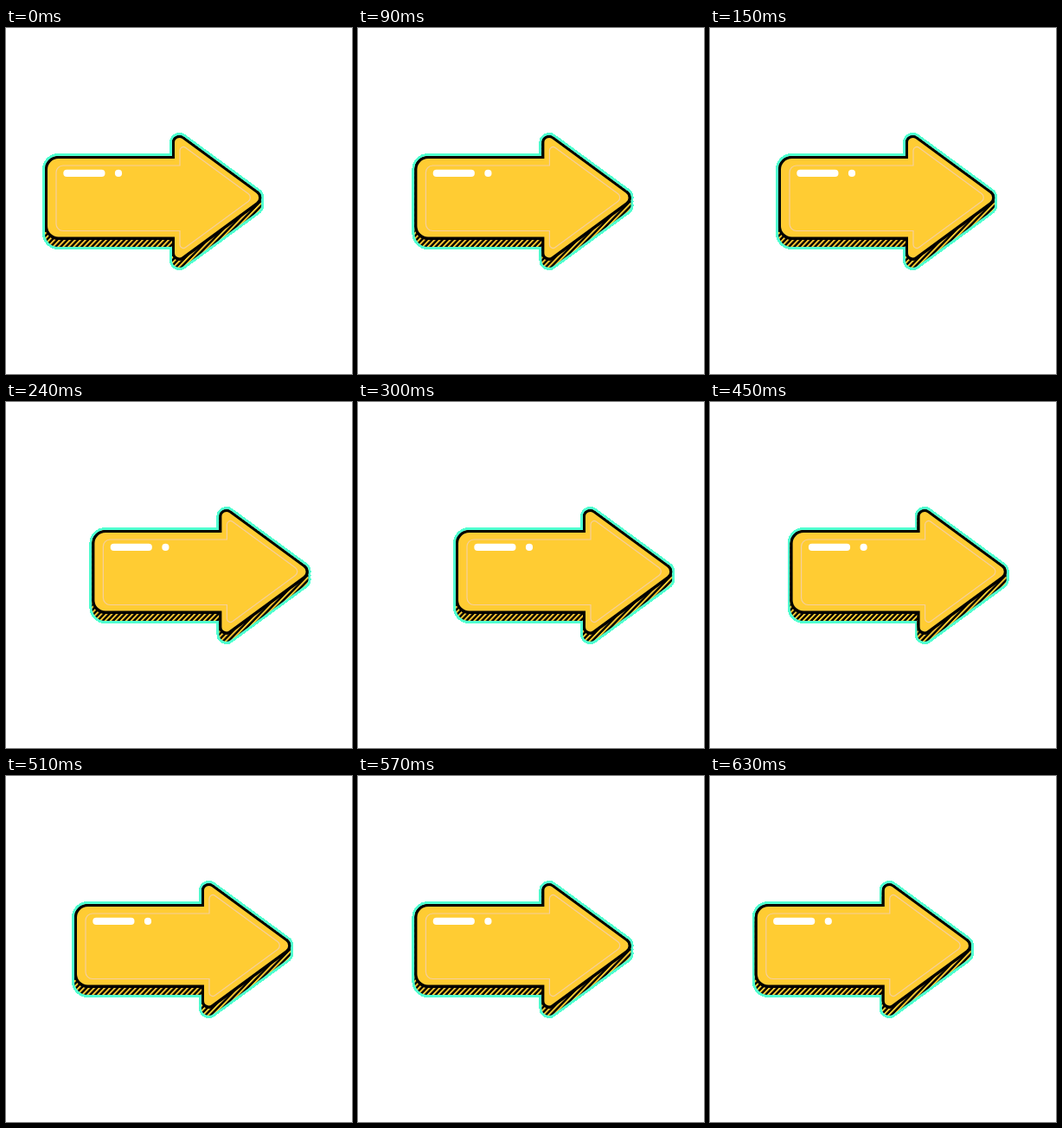
An HTML page that plays this animation: 400 px wide and 400 px high, repeating every 0.66 s.

```html
<!DOCTYPE html>
<html lang="en">
<head>
<meta charset="utf-8">
<title>Sliding arrow</title>
<style>
  html, body { margin: 0; width: 100%; height: 100%; overflow: hidden; background: #fff; }
  svg { display: block; width: 100%; height: 100%; }
</style>
</head>
<body>
<svg viewBox="0 0 400 400">
  <defs>
    <path id="shape" d="M60.5 149.5H193.5V132.5A7 7 0 0 1 204.7 126.9L290.2 189.6A8 8 0 0 1 290.2 202.8L204.7 265.5A7 7 0 0 1 193.5 259.9V243H60.5A14 14 0 0 1 46.500 229V163.500A14 14 0 0 1 60.500 149.500Z"/>
    <g id="block">
      <use href="#shape"/>
      <use href="#shape" y="4.3"/>
      <use href="#shape" y="8.6"/>
    </g>
    <pattern id="hatch" width="6" height="12" patternUnits="userSpaceOnUse" patternTransform="skewX(-44)">
      <rect width="6" height="12"/>
      <rect x="1" width="2.6" height="12" fill="#fc3"/>
    </pattern>
  </defs>
  <g id="arrow">
    <use href="#block" fill="#50ffd0" stroke="#50ffd0" stroke-width="9" shape-rendering="crispEdges"/>
    <use href="#block" fill="url(#hatch)" stroke="url(#hatch)" stroke-width="3"/>
    <use href="#shape" y="0.6" stroke="#000" stroke-width="3"/>
    <use href="#shape" fill="#fc3" stroke="#000" stroke-width="3"/>
    <path fill="none" stroke="#f5cf9c" stroke-width="1.2" d="M66 159H201V141.5A4 4 0 0 1 207.4 138.3L280 191.5A5.5 5.5 0 0 1 280 200.5L207.4 253.7A4 4 0 0 1 201 250.5V234.5H66A8 8 0 0 1 58 226.5V167A8 8 0 0 1 66 159Z"/>
    <g fill="#fff">
      <rect x="66.3" y="163.8" width="48.2" height="8.2" rx="4"/>
      <circle cx="130" cy="167.9" r="4.1"/>
    </g>
  </g>
</svg>
<script>
  const STEP_MS = 30, STEPS = 22, STEP_PX = 6.8;
  const arrow = document.getElementById('arrow');

  // Steady slide to the right and back, advancing once per step.
  function draw() {
    const step = Math.floor(performance.now() / STEP_MS) % STEPS;
    const x = STEP_PX * Math.min(step, STEPS - step);
    arrow.setAttribute('transform', `translate(${x.toFixed(2)} 0)`);
    requestAnimationFrame(draw);
  }
  draw();
</script>
</body>
</html>
```
